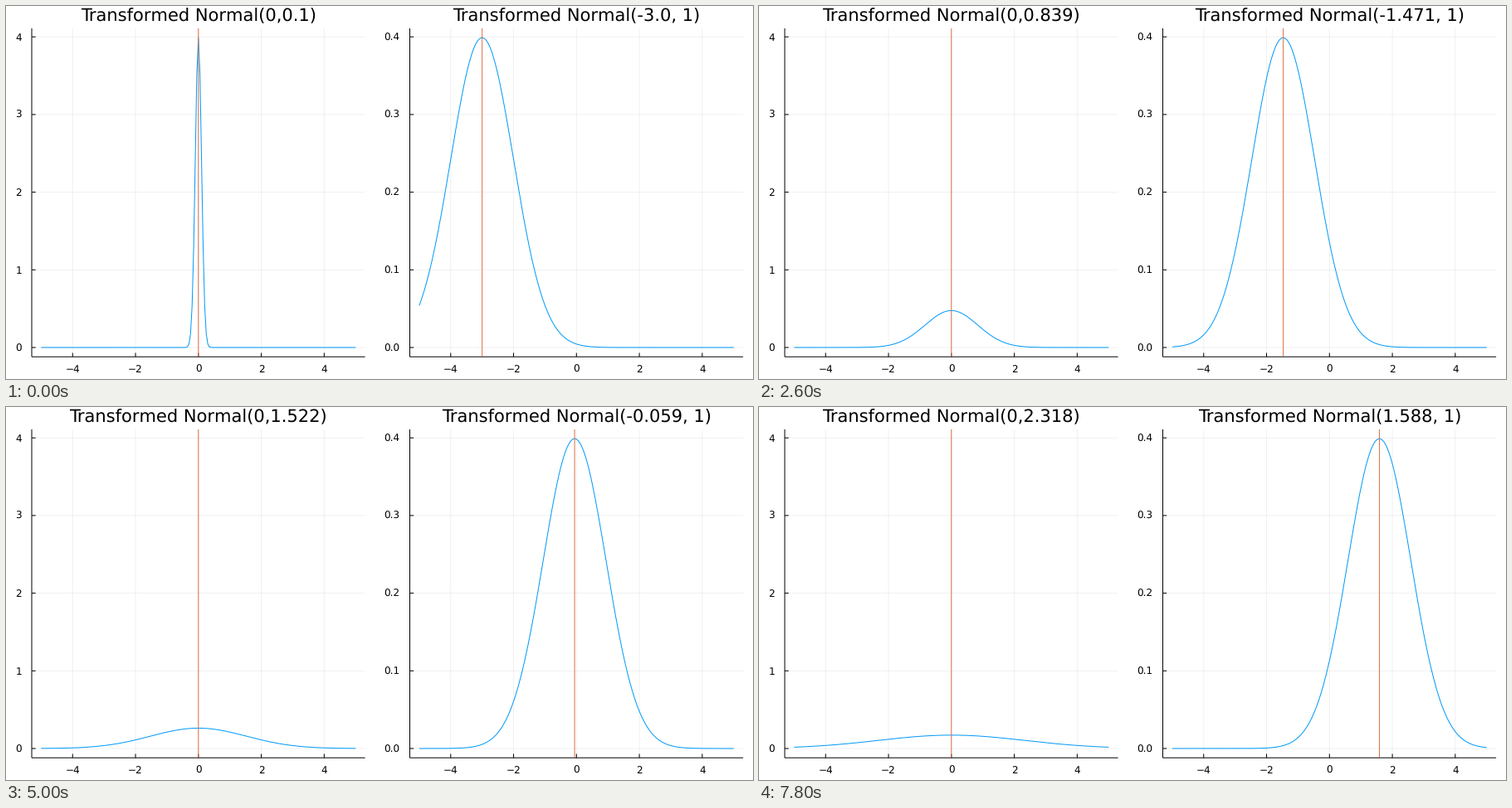
A matplotlib script that plays this animation: 900 px wide and 450 px high, repeating every 8 s.

```python
import numpy as np
import matplotlib.pyplot as plt
from matplotlib.animation import FuncAnimation

W, H = 900, 450
FRAMES, STEP_MS = 40, 200
STEPS = 51                      # steps in the full parameter sweep
BLUE, ORANGE = "#009afa", "#e26f46"
TOP, BOTTOM = 27.0, 423.2       # plot area, pixels from the top
PEAK = 1 / np.sqrt(2 * np.pi)

plt.rcParams.update({
    "font.family": "DejaVu Sans",
    "text.hinting": "none",
    "text.hinting_factor": 1,
})

# 72 dpi makes one point equal one pixel
fig = plt.figure(figsize=(W / 72, H / 72), dpi=72, facecolor="white")
x = np.linspace(-5, 5, 201)


def normal(mu, sigma):
    return PEAK / sigma * np.exp(-0.5 * ((x - mu) / sigma) ** 2)


def stroke(ax, xs, ys, color, **kw):
    line, = ax.plot(xs, ys, color=color, lw=1, snap=False,
                    solid_capstyle="butt", **kw)
    return line


def make_panel(left, right, peak, labels):
    """Build one plot and return its curve, mean line and title."""
    ax = fig.add_axes([left / W, 1 - BOTTOM / H,
                       (right - left) / W, (BOTTOM - TOP) / H])
    ax.axis("off")
    y0, y1 = -0.03 * peak, 1.03 * peak
    ax.set_xlim(-5.3, 5.3)
    ax.set_ylim(y0, y1)
    dx = 10.6 / (right - left)
    dy = (y1 - y0) / (BOTTOM - TOP)
    black = dict(zorder=2, clip_on=False)

    for v in range(-4, 5, 2):
        stroke(ax, [v, v], [y0, y1], "black", alpha=0.06, zorder=1)
        stroke(ax, [v, v], [y0, y0 + 4.7 * dy], "black", **black)
        ax.text(v, y0 - 18.3 * dy, str(v).replace("-", "\u2212"),
                size=12, ha="center", va="baseline")
    for label in labels:
        v = float(label)
        stroke(ax, [-5.3, 5.3], [v, v], "black", alpha=0.06, zorder=1)
        stroke(ax, [-5.3, -5.3 + 4.7 * dx], [v, v], "black", **black)
        ax.text(-5.3 - 12 * dx, v - 4.4 * dy, label,
                size=12, ha="right", va="baseline")
    stroke(ax, [-5.3, 5.3], [y0, y0], "black", **black)
    stroke(ax, [-5.3, -5.3], [y0, y1], "black", **black)

    curve = stroke(ax, x, 0 * x, BLUE, zorder=3)
    mean = stroke(ax, [0, 0], [y0, y1], ORANGE, zorder=4)
    title = ax.text(0, y1 + (TOP - 18.5) * dy, "", size=21,
                    ha="center", va="baseline")
    return curve, mean, title


wide = make_panel(31.0, 432.6, 10 * PEAK, [str(i) for i in range(5)])
moving = make_panel(486.5, 888.1, PEAK, [f"{i / 10:.1f}" for i in range(5)])


def show(panel, mu, sigma, text):
    curve, mean, title = panel
    curve.set_ydata(normal(mu, sigma))
    mean.set_xdata([mu, mu])
    title.set_text(f"Transformed Normal({text})")


def update(k):
    sigma = 0.1 + 2.9 * k / STEPS
    mu = -3 + 6 * k / STEPS
    show(wide, 0, sigma, f"0,{round(sigma, 3)}")
    show(moving, mu, 1, f"{round(mu, 3)}, 1")
    return wide + moving


anim = FuncAnimation(fig, update, frames=FRAMES, interval=STEP_MS,
                     init_func=lambda: update(0), repeat=True,
                     repeat_delay=0, blit=False)
plt.show()
```
